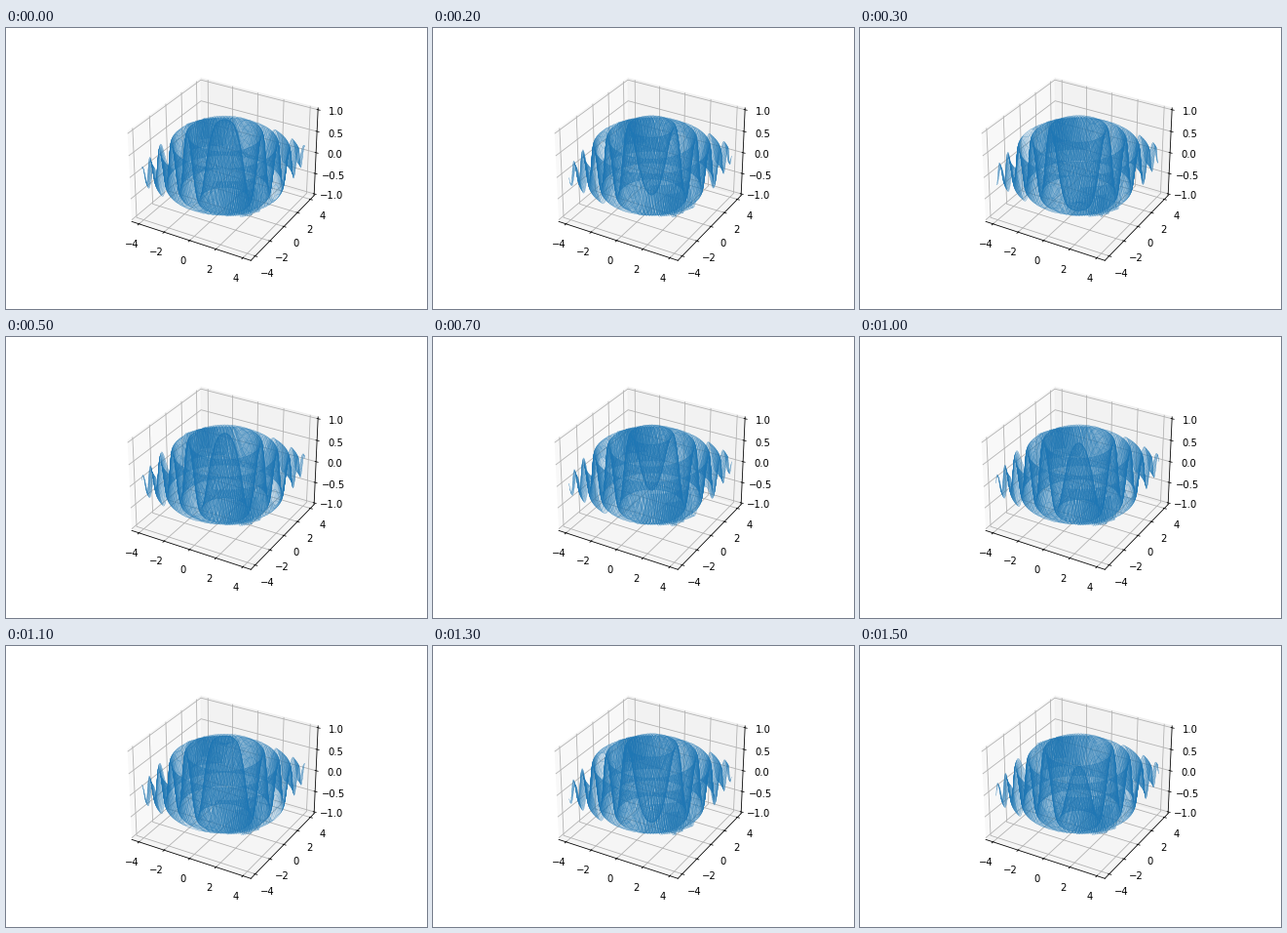
A matplotlib script for the animation above (1600 ms loop, 432 px wide and 288 px high).

```python
import numpy as np
import matplotlib.pyplot as plt
from matplotlib.animation import FuncAnimation

FRAMES = 16
INTERVAL = 100
CYCLES = 3          # wave periods per loop
EXTENT = 4
PAD = 25 / 24       # room between the data limits and the box

plt.rcParams["font.family"] = "DejaVu Sans"

fig = plt.figure(figsize=(6, 4), dpi=72)
fig.subplots_adjust(bottom=0.125)
ax = fig.add_subplot(projection="3d")

side = 1.1 * EXTENT * PAD
ax.set_xlim(-side, side)
ax.set_ylim(-side, side)
ax.set_zlim(-PAD, PAD)
ax.set_xticks(range(-4, 5, 2))
ax.set_yticks(range(-4, 5, 2))
ax.set_zticks(np.linspace(-1, 1, 5))

axis = np.linspace(-EXTENT, EXTENT, 200)
X, Y = np.meshgrid(axis, axis)
R2 = X**2 + Y**2
ENVELOPE = np.exp(-0.05 * R2)


def update(frame):
    """Redraw the damped ripple, which travels outwards."""
    for old in list(ax.collections):
        old.remove()
    phase = 2 * np.pi * CYCLES * frame / FRAMES
    Z = ENVELOPE * np.cos(R2 - phase)
    wire = ax.plot_wireframe(X, Y, Z, rcount=100, ccount=100,
                             color="#1f77b4", linewidth=0.2)
    return [wire]


anim = FuncAnimation(fig, update, frames=FRAMES, interval=INTERVAL,
                     repeat=True, repeat_delay=0, blit=False)
plt.show()
```
